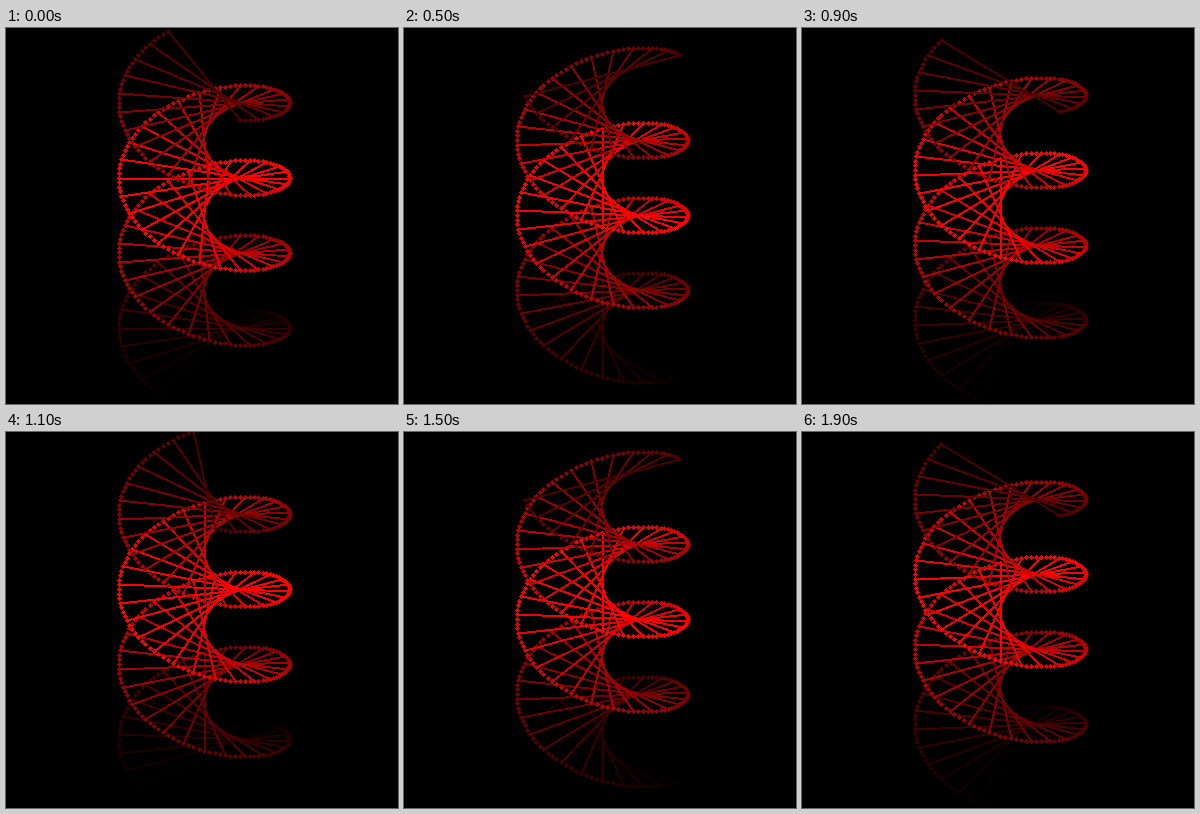
Animation of 392x376 px, one loop 2 s. Source, as an HTML page:

```html
<!DOCTYPE html>
<html lang="en">
<head>
<meta charset="utf-8">
<title>Helix</title>
<style>
  html, body { margin: 0; width: 100%; height: 100%; overflow: hidden; background: #000; }
  svg { display: block; width: 100%; height: 100%; }
  path { stroke-width: 2; shape-rendering: crispEdges; }
</style>
</head>
<body>
<svg id="stage" viewBox="0 0 392 376"></svg>
<script>
const CX = 198.5, RADIUS = 85.5, TILT = 49;
const PITCH = 150, TOP = 48, BOTTOM = 328, GAP = 1.5;
const RUNG_EVERY = 4, STEP_MS = 100, STEPS = 20;

const stage = document.getElementById('stage');
const count = Math.floor((BOTTOM - TOP) / GAP) + 1;

// Brightness rises from the top and fades to black at the bottom.
function shade(h) {
  const v = Math.min(255, 75 + (h - TOP) * 1.8, (BOTTOM - h) * 1.72);
  return `rgb(${Math.round(Math.max(0, v))},0,0)`;
}

function addPath(color, attr) {
  const p = document.createElementNS('http://www.w3.org/2000/svg', 'path');
  p.setAttribute(attr, color);
  stage.appendChild(p);
  return p;
}

// Lower levels first, so the upper coils cover them.
const levels = [];
for (let i = count - 1; i >= 0; i--) {
  const h = TOP + i * GAP, color = shade(h);
  levels.push({
    h,
    rung: i % RUNG_EVERY === 0 ? addPath(color, 'stroke') : null,
    dots: addPath(color, 'fill')
  });
}

const snap = v => Math.floor(v) + 0.5;
const diamond = (x, y) => `M${x - 2.5} ${y}l2.5 -2.5l2.5 2.5l-2.5 2.5z`;

function draw(step) {
  for (const { h, rung, dots } of levels) {
    const a = 2 * Math.PI * (h / PITCH - step / STEPS);
    const dx = RADIUS * Math.cos(a), dy = TILT * Math.sin(a);
    const x1 = snap(CX + dx), y1 = snap(h - dy);
    const x2 = snap(CX - dx), y2 = snap(h + dy);
    dots.setAttribute('d', diamond(x1, y1) + diamond(x2, y2));
    if (rung) rung.setAttribute('d', `M${x1} ${y1}L${x2} ${y2}`);
  }
}

const start = performance.now();
let shown = -1;
function tick() {
  const step = Math.floor((performance.now() - start) / STEP_MS) % STEPS;
  if (step !== shown) draw(shown = step);
  requestAnimationFrame(tick);
}
tick();
</script>
</body>
</html>
```
